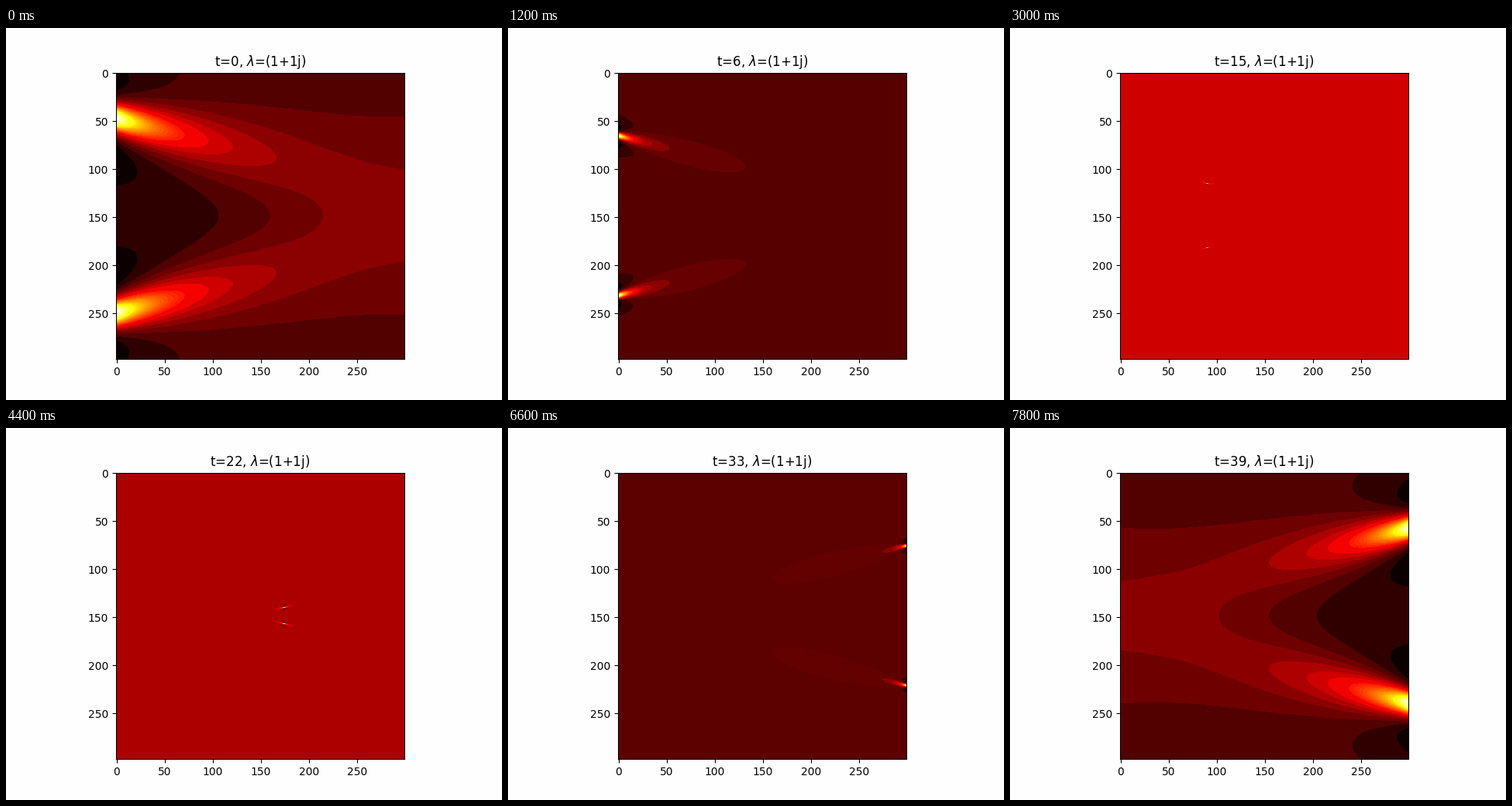
These frames come from a looping animation (640 px wide and 480 px high, 8000 ms). A matplotlib script:

```python
import numpy as np
import matplotlib
import matplotlib.pyplot as plt
from matplotlib.animation import FuncAnimation
from matplotlib.colors import ListedColormap

FRAMES, INTERVAL = 40, 200
COLS, ROWS = 300, 298
SLOPE = 0.25        # tilt and aspect of the lumps
CENTER = 148.5      # row of the mirror axis
INK = 1400          # share of black line work in the darkest shade

# The second difference along the rows needs one extra row at each end.
h, v = np.meshgrid(np.arange(COLS), np.arange(-1, ROWS + 1))
hot = matplotlib.colormaps["hot"](np.arange(256), bytes=True)[:, :3].astype(int)
shade = (hot[:, 0] >> 5) * 256 + (hot[:, 1] >> 4) * 8 + (hot[:, 2] >> 5)


def lump(t, side):
    """Quadratic form of one lump; side is -1 for the one starting on top."""
    y = h - (6 + 12 * (t - 8))
    row = CENTER + side * (75.5 - 6 * (t - 8))
    x = v - row + side * SLOPE * y
    core = 2.2e-4 if t < 20 else 0.022
    return x**2 + (SLOPE * y)**2 + core


def field(t):
    """u = second derivative of log F for the two-lump solution."""
    return np.diff(np.log(lump(t, -1)) + np.log(lump(t, 1)), n=2, axis=0)


def banded(u):
    """Hot colormap reduced to coarse shades, each the mean of its pixels."""
    level = np.minimum((u - u.min()) / np.ptp(u) * 256, 255).astype(int)
    count = np.bincount(level.ravel(), minlength=256)
    lut = hot.copy()
    for s in np.unique(shade):
        group = shade == s
        weight = count[group]
        total = weight.sum() + (INK if s == 0 else 0)
        if weight.sum():
            lut[group] = (weight @ hot[group]) // total
    return ListedColormap(lut / 255)


fig, ax = plt.subplots(figsize=(6.4, 4.8), dpi=100, facecolor="#fefefe")
image = ax.imshow(field(0), cmap="hot")
title = ax.set_title("")


def update(t):
    u = field(t)
    image.set_data(u)
    image.set_clim(u.min(), u.max())
    image.set_cmap(banded(u))
    title.set_text(rf"t={t}, $\lambda$=(1+1j)")
    return image, title


anim = FuncAnimation(fig, update, frames=FRAMES, interval=INTERVAL,
                     repeat=True, repeat_delay=0, blit=False)
plt.show()
```
